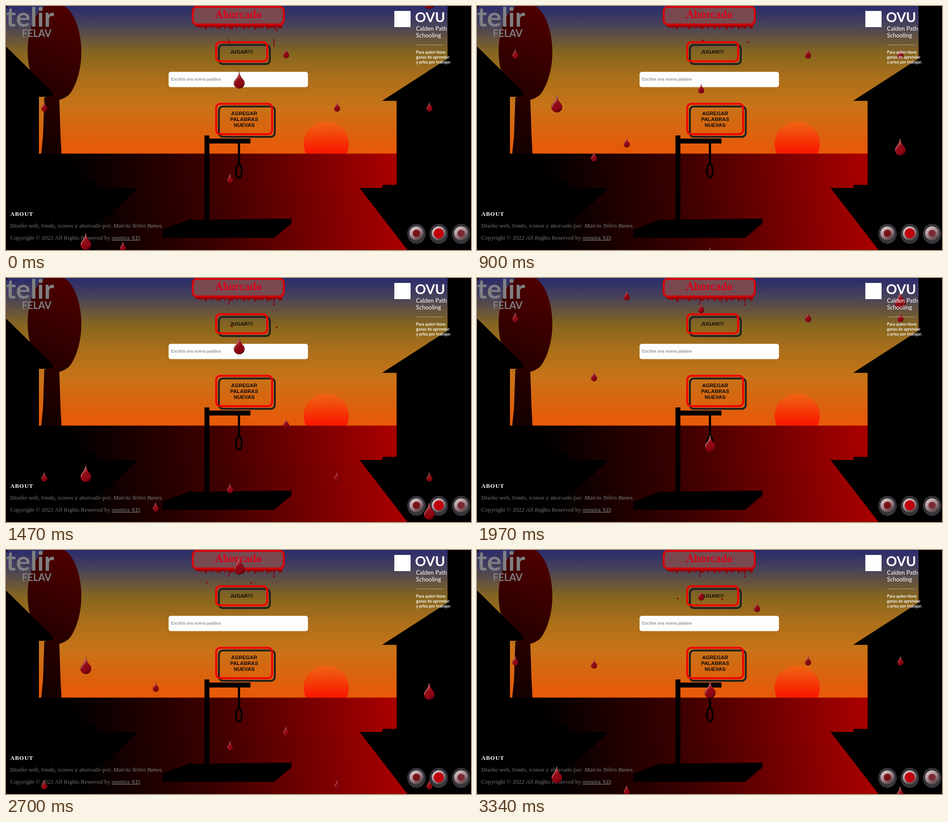
Write an HTML page with a canvas that moves like this. It is 1031 by 543 pixels and loops after 3380 ms.

```html
<!DOCTYPE html>
<html lang="es">
<head>
<meta charset="utf-8">
<title>Ahorcado</title>
<style>
html, body { margin: 0; width: 100%; height: 100%; overflow: hidden; background: #000; }
canvas { display: block; }
</style>
</head>
<body>
<canvas id="stage" width="1031" height="543"></canvas>
<script>
const W = 1031, H = 543, LOOP = 3380, STEP = 33.37;
const SERIF = '"Liberation Serif", serif';
const SANS = '"Liberation Sans", sans-serif';
const LATO = 'Lato, sans-serif';
const stage = document.getElementById('stage').getContext('2d');
const backdrop = document.createElement('canvas');
backdrop.width = W;
backdrop.height = H;
let g = backdrop.getContext('2d');

function linear(x0, y0, x1, y1, ...stops) {
  const fill = g.createLinearGradient(x0, y0, x1, y1);
  stops.forEach(([at, color]) => fill.addColorStop(at, color));
  return fill;
}

function polygon(fill, ...points) {
  g.beginPath();
  points.forEach(([x, y]) => g.lineTo(x, y));
  g.fillStyle = fill;
  g.fill();
}

function rect(fill, x, y, w, h) {
  g.fillStyle = fill;
  g.fillRect(x, y, w, h);
}

function ellipse(fill, x, y, rx, ry = rx) {
  g.beginPath();
  g.ellipse(x, y, rx, ry, 0, 0, Math.PI * 2);
  g.fillStyle = fill;
  g.fill();
}

function box(x, y, w, h, r, fill, border) {
  g.beginPath();
  g.roundRect(x, y, w, h, r);
  if (fill) { g.fillStyle = fill; g.fill(); }
  if (border) { g.strokeStyle = border; g.lineWidth = 4.25; g.stroke(); }
}

function text(str, x, y, font, color, align = 'left') {
  g.font = font;
  g.fillStyle = color;
  g.textAlign = align;
  g.fillText(str, x, y);
  return x + g.measureText(str).width;
}

function drawScene() {
  rect(linear(0, 0, 0, 328, [0, '#2a2c6c'], [0.13, '#48425a'], [0.32, '#86661f'],
    [0.5, '#ad701a'], [0.68, '#c87318'], [0.84, '#da640f'], [1, '#e85808']), 0, 0, W, 329);

  g.save();
  g.beginPath();
  g.rect(0, 0, W, 328);
  g.clip();
  ellipse(linear(0, 257, 0, 328, [0, '#ee6612'], [1, '#fa1500']), 710, 307, 50);
  g.restore();

  rect(linear(150, 440, 875, 345, [0, '#000'], [0.4, '#380000'], [1, '#ae0000']), 0, 328.5, W, 215);

  g.beginPath();
  g.moveTo(108, -6);
  g.bezierCurveTo(148, -6, 167, 50, 167, 104);
  g.bezierCurveTo(167, 150, 150, 188, 138, 199);
  g.quadraticCurveTo(118, 214, 98, 209);
  g.bezierCurveTo(66, 190, 48, 150, 48, 100);
  g.bezierCurveTo(48, 50, 68, -6, 108, -6);
  g.fillStyle = linear(60, 190, 150, 10, [0, '#240000'], [1, '#4e0000']);
  g.fill();
  polygon(linear(80, 328, 115, 205, [0, '#120000'], [1, '#280000']),
    [85, 203], [118, 203], [121, 290], [123, 329], [78, 329], [82, 290]);

  polygon('#000', [0, 90], [103, 192], [103, 202], [73, 202], [73, 388], [198, 388],
    [198, 405], [292, 405], [145, H], [0, H]);
  polygon('#000', [979, 0], [979, 117], [834, 211], [866, 211], [866, 398], [835, 398],
    [835, 405], [784, 405], [890, H], [W, H], [W, 0]);
  polygon('#000', [0, 0], [7, 0], [2, 2], [0, 7]);

  rect('#000', 440, 288, 11, 190);
  rect('#000', 440, 295, 102, 11);
  rect('#000', 514, 306, 5, 46);
  g.beginPath();
  g.ellipse(516.3, 367, 6.5, 15, 0, 0, Math.PI * 2);
  g.strokeStyle = '#000';
  g.lineWidth = 4;
  g.stroke();
  polygon('#000', [405, 476], [633, 473], [633, 484], [594, 516], [348, 516], [346, 498]);
}

function drawLogos() {
  text('telir', 0, 46, `bold 60px ${LATO}`, '#7f7f82');
  text('FELAV', 35, 69, `bold 22px ${LATO}`, '#7f7f82');

  rect('#fff', 861, 11, 36, 36);
  text('OVU', 907, 36, `bold 30px ${LATO}`, '#fff');
  text('Calden Path', 909, 55, `13px ${LATO}`, '#fff');
  text('Schooling', 909, 70, `13px ${LATO}`, '#fff');
  rect('#b9a98c', 910, 86, 59, 1);
  ['Para quien tiene', 'ganas de aprender', 'y prisa por trabajar.'].forEach((line, i) =>
    text(line, 909, 106 + i * 11, `bold 9.1px ${LATO}`, '#f4f4f4'));
}

function drawButton(w, h, y, lines) {
  box(472, y + 8, w, h, 9, null, '#222');
  box(466, y + 2, w, h, 9, null, '#f00000');
  lines.forEach((line, i) =>
    text(line, w < 120 ? 522 : 528, y + 27 + i * 13.1, `bold 11.35px ${SANS}`, '#0a0a0a', 'center'));
}

function drawControls() {
  box(414, 2, 202, 39, 9, '#784a50', '#d90008');
  text('Ahorcado', 515, 27, `bold 24.6px ${SERIF}`, '#d8001a', 'center');

  // ragged lower edge of the title
  g.beginPath();
  g.moveTo(420, 42);
  for (let x = 420; x <= 613; x += 1.5) {
    g.lineTo(x, 44.5 + 2.5 * Math.abs(Math.sin(x * 0.11)) + 4 * Math.sin(x * 0.23) ** 8
      + 3 * Math.sin(x * 0.37 + 1) ** 4);
  }
  g.lineTo(613, 42);
  g.fillStyle = linear(0, 42, 0, 53, [0, '#b00008'], [1, '#700006']);
  g.fill();

  drawButton(113, 42.5, 78.7, ['JUGAR!!!']);
  drawButton(124, 67.5, 215.7, ['AGREGAR', 'PALABRAS', 'NUEVAS']);
  box(360.5, 146.5, 309, 34, 5, '#fdfdfd');
  text('Escriba una nueva palabra', 366, 166, `9.25px ${SANS}`, '#757575');
}

function drawFooter() {
  g.letterSpacing = '1px';
  text('ABOUT', 9.5, 467, `bold 13px ${SERIF}`, '#fff');
  g.letterSpacing = '0px';
  const font = `13.1px ${SERIF}`, gray = '#737373';
  let x = text('Diseño web, fondo, iconos y ahorcado por: ', 9.3, 493, font, gray);
  text('Marcio Teliro Banes.', x, 493, `italic ${font}`, '#858585');
  x = text('Copyright © 2022 All Rights Reserved by ', 9.3, 520, font, gray);
  const end = text('mentira XD', x, 520, font, '#858585');
  rect('#858585', x, 521, end - x, 1);
  text('.', end, 520, font, gray);

  [[910, '#7a1018', 8], [959.5, '#c0000c', 11], [1009, '#7a2a30', 8]].forEach(([cx, color, r]) => {
    ellipse('#34343a', cx, 507, 20.5, 22.5);
    ellipse(linear(cx - 9, 493, cx + 9, 521, [0, '#d8c4c6'], [0.5, '#9a8084'], [1, '#4a3a3d']), cx, 506, 15.5);
    ellipse(color, cx, 506, r);
  });
}

// x, lower end at the start of the loop, duration of a fall, scale
const SMALL = 0.56;
const drops = [
  [85, 235, 1100, SMALL], [734, 235, 1100, SMALL], [939, 235, 1100, SMALL],
  [621, 116, 1100, SMALL], [259.5, 546, 1300, SMALL], [497, 394.5, 1300, SMALL],
  [332, -11.5, 1800, SMALL], [517, 183.5, 1500, 1], [177, 543, 1700, 1], [938.5, 6.5, 1800, 1]
];
const FALL = H * 1.2, FLOOR = 600;

function drawDrop(x, bottom, scale) {
  g.save();
  g.translate(x, bottom);
  g.scale(scale, scale);
  g.beginPath();
  g.moveTo(0, -38);
  g.bezierCurveTo(1, -30, 4, -25, 7.5, -21);
  g.bezierCurveTo(10.5, -18, 11.8, -15, 11.8, -11.8);
  g.arc(0, -11.8, 11.8, 0, Math.PI);
  g.bezierCurveTo(-11.8, -15, -10.5, -18, -7.5, -21);
  g.bezierCurveTo(-4, -25, -1, -30, 0, -38);
  g.fillStyle = linear(-9, -24, 8, -2, [0, '#b8444c'], [0.3, '#920a18'], [0.75, '#8a0412'], [1, '#4c0008']);
  g.fill();
  g.strokeStyle = 'rgba(60,0,8,.6)';
  g.lineWidth = 1;
  g.stroke();
  g.beginPath();
  g.moveTo(0, -37);
  g.bezierCurveTo(-1, -30, -3.5, -25, -6.5, -20.5);
  g.quadraticCurveTo(-10.3, -17, -10.3, -11);
  g.strokeStyle = 'rgba(222,160,160,.6)';
  g.lineWidth = 1.6;
  g.stroke();
  g.restore();
}

function hang(x, bottom) {
  rect('#8c0008', x - 0.8, 46, 1.6, bottom - 47);
  ellipse('#8c0008', x, bottom - 2, 1.7, 2);
}

function drawDrips(t) {
  const grow = Math.min(1, Math.max(0, (t - 900) / 570));
  hang(494, 50 + 10 * grow);
  hang(594, 50 + 12 * grow);
  if (t < 480) { hang(501, 52); hang(600, 57); }
  if (t > 1470 && t < 2450) {
    const late = Math.min(1, (t - 1470) / 800);
    hang(445, 48 + 10 * late);
    hang(543, 48 + 10 * late);
  }
  if (t < 700) {
    const slide = t / 430;
    rect('#780008', 493.5, 73 + 15 * slide, 1.6, 10 + 4 * slide);
    rect('#780008', 593, 73 + 13 * slide, 1.8, 18);
  }
  const bead = (x, y) => ellipse('#8c0008', x, y, 1.8, 2.2);
  if (t >= 480 && t < 1800) {
    bead(501, 77 + 0.0544 * (t - 900));
    bead(600, 81 + 0.051 * (t - 900));
  }
  if (t >= 2450) {
    bead(445, 89 + 0.056 * (t - 3000));
    bead(543.5, 91 + 0.056 * (t - 3000));
  }
}

function render(now) {
  const t = Math.floor((now % LOOP + 5) / STEP) * STEP;
  g.drawImage(backdrop, 0, 0);
  drawDrips(t);
  for (const [x, start, duration, scale] of drops) {
    const y = start + FALL * t / duration;
    drawDrop(x, y - FALL * Math.ceil((y - FLOOR) / FALL), scale);
  }
  drawLogos();
}

drawScene();
drawControls();
drawFooter();
g = stage;

let began;
function tick(now) {
  began ??= now;
  render(now - began);
  requestAnimationFrame(tick);
}
render(0);
requestAnimationFrame(tick);
</script>
</body>
</html>
```
